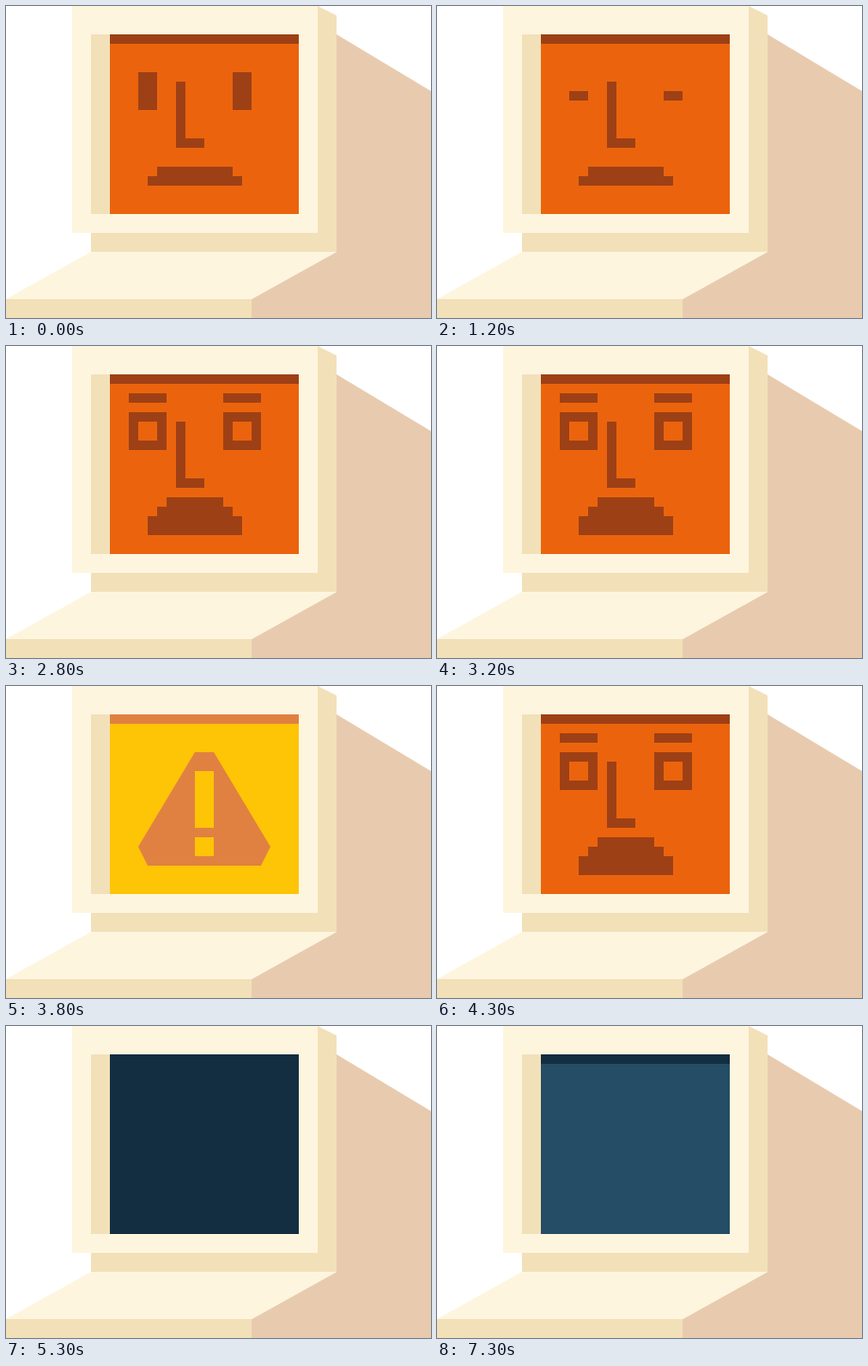
These frames come from a looping animation (450 px wide and 330 px high, 8000 ms). An HTML page without scripts:

```html
<!DOCTYPE html>
<html lang="en">
<head>
<meta charset="utf-8">
<title>Computer shutting down</title>
<style>
html, body { margin: 0; width: 100%; height: 100%; overflow: hidden; background: #fff; }
svg { display: block; width: 450px; height: 330px; }

.cream { fill: #fef5de; }
.shade { fill: #f2e0b9; }
.shadow { fill: #e8cbae; }
.orange { fill: #eb640d; }
.brown { fill: #9e4015; }
.yellow { fill: #fec406; }
.rust { fill: #e08142; }
.navy { fill: #132e40; }
.blue { fill: #254d66; }

/* every state switches hard; the tiny lead keeps switches on time */
.anim { animation: 8s step-end -2ms infinite; }
.open { animation-name: open; }
.shut { animation-name: shut; }
.look { animation-name: look; }
.glance { animation-name: glance; }
.calm { animation-name: calm; }
.shock { animation-name: shock; }
.slow { animation-name: slow; }
.fast { animation-name: fast; }
.off { animation-name: off; }
.glow { animation-name: glow; }
.late { animation: late .4s step-end -2ms infinite; }
.early { animation: early .2s step-end -2ms infinite; }

@keyframes open { 0%, 16.25% { opacity: 1 } 15%, 18.75%, 100% { opacity: 0 } }
@keyframes shut { 0%, 16.25%, 20%, 100% { opacity: 0 } 15%, 18.75% { opacity: 1 } }
@keyframes look { 0%, 31.25%, 100% { opacity: 0 } 20% { opacity: 1 } }
@keyframes glance {
  0%, 27.5%, 100% { transform: translateX(10px) }
  23.75% { transform: translateX(-10px) }
}
@keyframes calm { 0% { opacity: 1 } 31.25%, 100% { opacity: 0 } }
@keyframes shock { 0%, 66.25%, 100% { opacity: 0 } 31.25% { opacity: 1 } }
@keyframes slow { 0%, 47.5%, 100% { opacity: 0 } 32.5% { opacity: 1 } }
@keyframes fast { 0%, 66.25%, 100% { opacity: 0 } 47.5% { opacity: 1 } }
@keyframes off { 0% { opacity: 0 } 66.25%, 100% { opacity: 1 } }
@keyframes glow { 0% { opacity: 0 } 91.25%, 100% { opacity: 1 } }
@keyframes late { 0%, 100% { opacity: 0 } 50% { opacity: 1 } }
@keyframes early { 0% { opacity: 1 } 50%, 100% { opacity: 0 } }
</style>
</head>
<body>
<svg viewBox="0 0 450 330" width="450" height="330">
  <defs>
    <g id="alert">
      <path class="yellow" d="M110 30h200v190h-200z"/>
      <path class="rust" d="M110 30h200v10h-200zM200 70h20l60 100-10 20H150l-10-20z"/>
      <path class="yellow" d="M200 90h20v60h-20zM200 160h20v20h-20z"/>
    </g>
  </defs>

  <!-- case -->
  <path class="shadow" d="M350 30l100 60v240H260v-20l90-50z"/>
  <path class="shade" d="M330 0l20 10v250H90v-20h240z"/>
  <path class="cream" d="M70 0h260v240H70z"/>
  <path class="cream" d="M90 260h260l-90 50H0z"/>
  <path class="shade" d="M0 310h260v20H0zM90 30h20v190H90z"/>

  <!-- screen -->
  <path class="orange" d="M110 30h200v190h-200z"/>
  <g class="brown">
    <path d="M110 30h200v10h-200zM180 80h10v60h20v10h-30z"/>
    <g class="anim calm">
      <path d="M160 170h80v10h10v10H150v-10h10z"/>
      <path class="anim open" d="M140 70h20v40h-20zM240 70h20v40h-20z"/>
      <path class="anim shut" d="M140 90h20v10h-20zM240 90h20v10h-20z"/>
      <g class="anim look">
        <path class="anim glance" d="M140 81h20v28h-20zM240 81h20v28h-20z"/>
      </g>
    </g>
    <g class="anim shock">
      <path d="M130 50h40v10h-40zM230 50h40v10h-40z"/>
      <path fill-rule="evenodd" d="M130 70h40v40h-40zm10 10v20h20v-20zM230 70h40v40h-40zm10 10v20h20v-20z"/>
      <path d="M170 160h60v10h10v10h10v20H150v-20h10v-10h10z"/>
    </g>
  </g>
  <g class="anim slow"><use class="late" href="#alert"/></g>
  <g class="anim fast"><use class="early" href="#alert"/></g>
  <path class="navy anim off" d="M110 30h200v190h-200z"/>
  <path class="blue anim glow" d="M110 40h200v180h-200z"/>
</svg>
</body>
</html>
```
